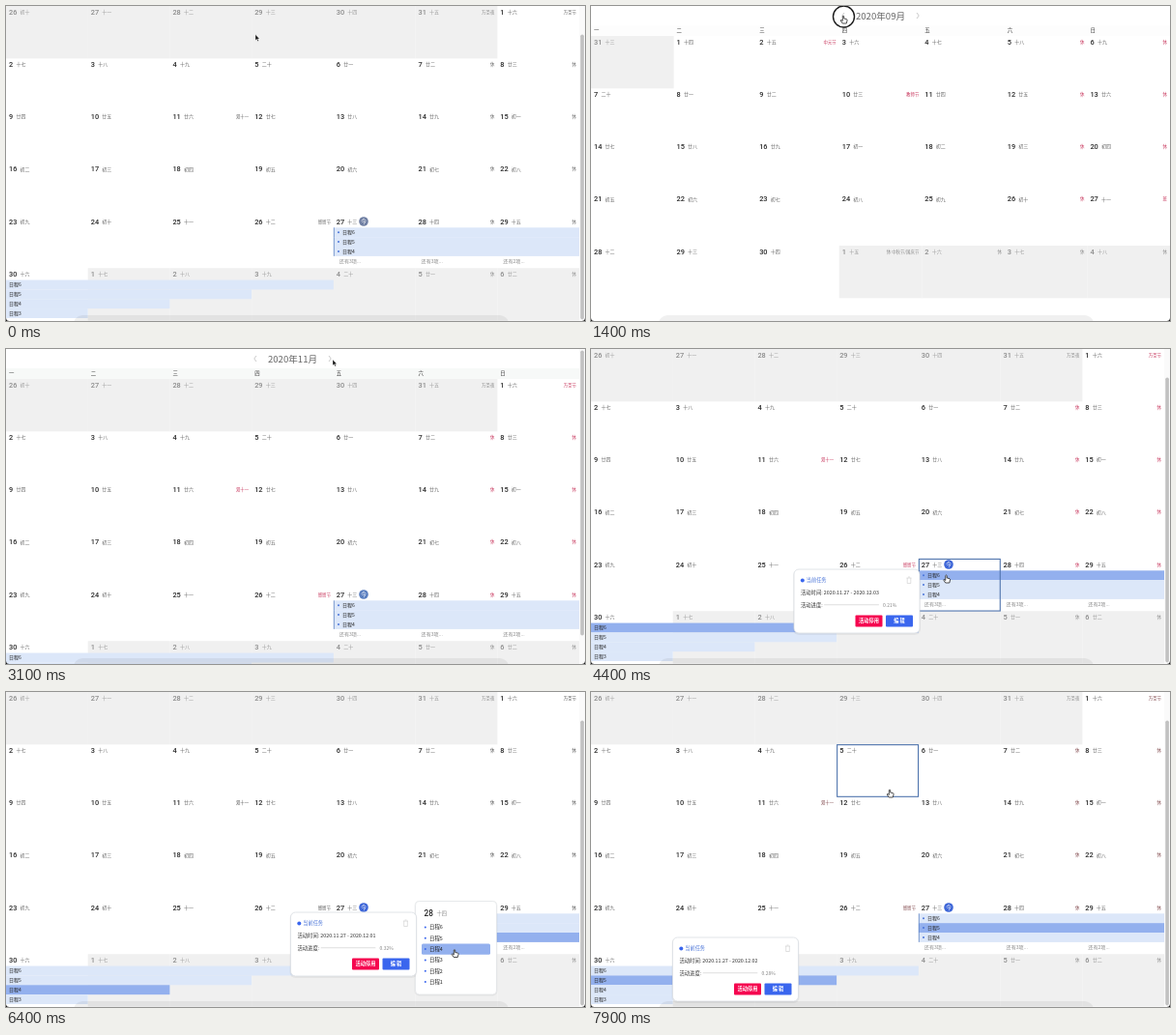
Recreate the animation shown at these times as an HTML page. Size 599x326 px, loop 8 s.

```html
<!DOCTYPE html>
<html lang="zh-CN">
<head>
<meta charset="utf-8">
<title>日历</title>
<style>
html, body { margin: 0; width: 100%; height: 100%; overflow: hidden; background: #fff; }
svg { display: block; width: 599px; height: 326px; }
text { font-family: 'Noto Sans CJK SC', 'Noto Sans CJK', 'Noto Sans', sans-serif; white-space: pre; }
.num { font-family: Roboto, Inter, sans-serif; font-weight: 500; }
.accent { fill: var(--accent); }
.today { fill: var(--today); }
</style>
</head>
<body>
<svg viewBox="0 0 599 326">
  <g id="page"><g id="months"></g><g id="live"></g></g>
  <g id="overlay"></g>
  <rect x="70" y="320" width="450" height="20" rx="9" fill="#000" opacity=".06"/>
  <path d="M0 322.500Q0 326 3.500 326H0ZM599 322.500Q599 326 595.500 326H599Z" fill="#111"/>
  <g id="pointer"></g>
</svg>
<script>
const LOOP = 8000, HEAD = 31, ROW = 54.25, DAY = 864e5;
const BAR = 9.85, LIGHT = '#dce7f9', STRONG = '#93b0ee', BLUE = '#3a66ee';
const $ = id => document.getElementById(id);

const rect = (x, y, w, h, fill, extra = '') =>
  `<rect x="${x}" y="${y}" width="${w}" height="${h}" fill="${fill}" ${extra}/>`;
const circle = (x, y, r, extra) => `<circle cx="${x}" cy="${y}" r="${r}" ${extra}/>`;
// y is the visual middle of the line
const text = (x, y, size, str, fill, extra = '') =>
  `<text x="${x}" y="${y + size * 0.37}" font-size="${size}" fill="${fill}" ${extra}>${str}</text>`;

// ---- calendar ----
const DIGITS = '一二三四五六七八九十';
const NEW_MOONS = [0, 29, 59, 88];
const FIRST_MOON = Date.UTC(2020, 7, 19);
const SPECIAL = {
  '9-2': '中元节', '9-10': '教师节', '9-27': '班', '10-1': '休 中秋节/国庆节', '10-10': '班',
  '10-25': '重阳节', '10-31': '万圣夜', '11-1': '万圣节', '11-11': '双十一', '11-26': '感恩节'
};
const MONTHS = [
  { month: 9, start: Date.UTC(2020, 7, 31), rows: 5, width: 599 },
  { month: 10, start: Date.UTC(2020, 8, 28), rows: 5, width: 599 },
  { month: 11, start: Date.UTC(2020, 9, 26), rows: 6, width: 593 }
];
const [SEP, OCT, NOV] = MONTHS;

function lunar(time) {
  const days = Math.round((time - FIRST_MOON) / DAY);
  const d = days - NEW_MOONS.filter(n => n <= days).pop();
  if (d === 19) return '二十';
  if (d === 29) return '三十';
  return '初十廿'[Math.floor(d / 10)] + DIGITS[d % 10];
}

function dayAt(m, row, col) {
  const time = m.start + (row * 7 + col) * DAY, date = new Date(time);
  return { time, month: date.getUTCMonth() + 1, day: date.getUTCDate() };
}

function note({ month, day }, col) {
  const holiday = month === 10 && day <= 8;
  return SPECIAL[`${month}-${day}`] || (col > 4 || holiday ? '休' : '');
}

function drawMonth(m) {
  const cw = m.width / 7, mid = m.width / 2;
  const chevron = (x, d) =>
    `<path d="M${x - d} 7l${d * 2.2} 3l${-d * 2.2} 3" fill="none" stroke="#bbb" stroke-width=".8"/>`;
  let out = text(mid, 10, 9.6, `2020年${String(m.month).padStart(2, '0')}月`, '#666', 'text-anchor="middle"');
  out += chevron(mid - 38.5, -1) + chevron(mid + 38.5, 1);
  out += rect(0, 20, m.width, 11, m === NOV ? '#f7f9f8' : '#fdfdfd');
  for (let col = 0; col < 7; col++) {
    out += text(col * cw + 3, 25.3, 5.4, (DIGITS.slice(0, 6) + '日')[col], '#333', 'font-weight="500"');
  }
  for (let row = 0; row < m.rows; row++) for (let col = 0; col < 7; col++) {
    const d = dayAt(m, row, col), x = col * cw, y = HEAD + row * ROW, other = d.month !== m.month;
    if (other) out += rect(x, y, cw + 0.1, ROW + 0.1, '#f0f0f0');
    out += text(x + 3, y + 5.9, 7.4, d.day, other ? '#8c8c8c' : '#2c2c2c', 'class="num"');
    out += text(x + (d.day > 9 ? 14.5 : 10.5), y + 5.9, 5, lunar(d.time), other ? '#999' : '#666');
    out += text(x + cw - 3, y + 5.9, 4.4, note(d, col), '#8c8c8c',
      `text-anchor="end" ${other ? '' : 'class="accent"'}`);
  }
  if (m === NOV) {
    const y = HEAD + 4 * ROW;
    out += circle(370, y + 6, 4.8, 'class="today"');
    out += text(370, y + 6, 5.6, '今', '#fff', 'text-anchor="middle"');
    [3, 3, 2].forEach((n, i) => {
      out += text((4 + i) * cw + 6, y + 47.3, 5.1, `还有${n}项...`, '#8a8a8a');
    });
  }
  return `<g>${out}</g>`;
}
$('months').innerHTML = MONTHS.map(drawMonth).join('');
const monthNodes = [...$('months').children];

// ---- timeline ----
const at = (list, t) => list.filter(e => e[0] <= t).pop()[1];
const ease = p => p * p * (3 - 2 * p);
const ramp = (t, a, b) => ease(Math.min(1, Math.max(0, (t - a) / (b - a))));

const SHOWN = [[0, NOV], [800, OCT], [1350, SEP], [2250, OCT], [3100, NOV]];
const ACTIVE = [[0, 0], [4300, 6], [4700, 5], [4900, 4], [7100, 5]];
const ACCENT = [[0, '#666'], [1100, '#c8385e'], [6100, '#555'], [7000, '#80484c']];
const TODAY = [[0, '#6f7fa3'], [1100, '#5a7fc0'], [3400, '#3f67d8']];
const CARD = [[0, null], [4300, [210, 228]], [5550, null], [6250, [294.5, 228]], [6750, null], [7200, [84.5, 254]]];
const CLICKS = [800, 1350, 2250, 5800];
const LIST = [5850, 6750];
const PATH = [
  [0, 258, 29.500], [200, 258, 29.500], [700, 261, 10], [1550, 261, 10], [2050, 338, 11], [3400, 338, 11],
  [4250, 367.5, 234], [4500, 367.5, 234], [4950, 366, 253], [5150, 366, 253], [5400, 397.5, 235],
  [5750, 440, 264], [5900, 440, 264], [6250, 464, 266.5], [6500, 464, 266.5],
  [7100, 45, 298], [7400, 45, 298], [7900, 309, 101], [8000, 309, 101]
];

function pointerAt(t) {
  const i = Math.max(1, PATH.findIndex(p => p[0] > t));
  const [a, ax, ay] = PATH[i - 1], [b, bx, by] = PATH[i], p = ramp(t, a, b);
  return { x: ax + (bx - ax) * p, y: ay + (by - ay) * p };
}

// ---- moving parts ----
function drawBars(active, x, y, listOpen) {
  const cw = NOV.width / 7;
  let out = '';
  const bar = (id, row, left, width, label) => {
    const top = HEAD + row * ROW + 12.3 + (6 - id) * BAR;
    const hover = !listOpen && x >= left && x < left + width && y >= top && y < top + BAR;
    out += rect(left, top, width, BAR + 0.05, id === active || hover ? STRONG : LIGHT);
    out += text(label, top + 4.9, 5, `日程${id}`, '#222');
  };
  for (let id = 6; id > 3; id--) {
    bar(id, 4, 4 * cw, 3 * cw, 348);
    const top = HEAD + 4 * ROW + 12.3 + (6 - id) * BAR;
    out += circle(344, top + 4.9, 1, 'fill="#4a74d8"') + rect(4 * cw, top, 0.8, BAR, '#6488c4');
  }
  for (let id = 6; id > 2; id--) bar(id, 5, 0, (id - 2) * cw, 3);
  return out;
}

function drawCard([x, y], id) {
  const end = { 6: '12.03', 5: '12.02', 4: '12.01' }[id];
  const rate = { 6: '0.21%', 5: '0.28%', 4: '0.32%' }[id];
  const button = (left, fill, label) => rect(left, 47.500, 28, 12, fill, 'rx="1"') +
    text(left + 14, 53.5, 5.2, label, '#fff', 'text-anchor="middle" font-weight="700"');
  return `<g transform="translate(${x} ${y})">` +
    rect(-1, 0, 132, 68, '#000', 'rx="6" opacity=".05"') +
    rect(0, 0, 130, 66, '#fff', 'rx="5" stroke="#dadde2" stroke-width=".8"') +
    circle(8.8, 11.5, 2, `fill="${BLUE}"`) + text(12.8, 11.5, 5.2, '当前任务', '#4a74d8') +
    '<path d="M116.500 9h5M117.200 9v5.500h3.600V9M118 8h2" fill="none" stroke="#ccc" stroke-width=".6"/>' +
    text(7, 24.3, 5.3, `活动时间: 2020.11.27 - 2020.${end}`, '#333') +
    text(7, 36.8, 5.3, '活动进度:', '#333') +
    rect(31, 36.3, 57, 1, '#dedede', 'rx=".5"') + text(92, 36.8, 5, rate, '#888') +
    button(63.5, '#f5064f', '活动停用') + button(95, BLUE, '编 辑') + '</g>';
}

function drawList(px, py) {
  let out = rect(422.500, 216, 86, 98.500, '#000', 'rx="5" opacity=".05"') +
    rect(423.5, 216.5, 84, 96.5, '#fff', 'rx="4" stroke="#e0e2e6" stroke-width=".7"') +
    text(432.5, 229, 8.2, '28', '#222', 'class="num"') + text(445.5, 229, 5.3, '十四', '#888');
  for (let i = 0; i < 6; i++) {
    const y = 243.5 + i * 11.3;
    if (px > 430 && px < 501 && Math.abs(py - y) < 5.65) out += rect(430, y - 5.6, 71, 11.2, STRONG, 'rx="1.5"');
    out += circle(433.8, y, 1, `fill="${BLUE}"`) + text(438, y, 5.4, `日程${6 - i}`, '#222');
  }
  return out;
}

function drawPointer(x, y, hand) {
  const shape = hand
    ? 'M-.7 .5Q0-.5 .7 .5V3L3.500 3.600Q4.200 4 4 5L3.300 8H-.8L-2.800 5Q-2.600 4-1.600 4.700L-.7 5.500Z'
    : 'M0 0V6L1.400 4.800L2.400 7L3.400 6.500L2.400 4.500H4.200Z';
  return `<path transform="translate(${x} ${y})" d="${shape}" fill="${hand ? '#fff' : '#111'}"
    stroke="${hand ? '#222' : '#fff'}" stroke-width="${hand ? 0.8 : 0.35}"/>`;
}

function render(t) {
  const m = at(SHOWN, t), active = at(ACTIVE, t), card = at(CARD, t);
  const listOpen = t >= LIST[0] && t < LIST[1];
  const scroll = m === NOV ? 31 * (1 - ramp(t, 200, 500) + ramp(t, 3400, 3750)) : 0;
  const { x, y } = pointerAt(t), pageY = y + scroll, cw = m.width / 7;
  const col = Math.floor(x / cw), row = Math.floor((pageY - HEAD) / ROW);
  const onDay = row >= 0 && row < m.rows && dayAt(m, row, col).month === m.month;

  document.documentElement.style.setProperty('--accent', at(ACCENT, t));
  document.documentElement.style.setProperty('--today', at(TODAY, t));
  monthNodes.forEach((node, i) => { node.style.display = MONTHS[i] === m ? '' : 'none'; });
  $('page').setAttribute('transform', `translate(0 ${-scroll})`);

  let live = m === NOV ? drawBars(active, x, pageY, listOpen) : '';
  if (onDay && !listOpen) {
    live += rect(col * cw + 0.5, HEAD + row * ROW + 0.4, cw - 0.8, ROW - 0.6, 'none',
      'stroke="#4f74ad" stroke-width="1.1"');
  }
  $('live').innerHTML = live;

  let over = '';
  if (m === NOV) over += rect(593, 0, 6, 326, '#fafafa') + rect(594.3, 1.5 + scroll * 0.9, 3.6, 295, '#c1c1c1', 'rx="1.800"');
  if (listOpen) over += drawList(x, y);
  if (card) over += drawCard(card, active);
  $('overlay').innerHTML = over;

  const clicking = CLICKS.some(c => t >= c && t < c + 200);
  const hand = onDay || listOpen || (y < 20 && t < 3100);
  $('pointer').innerHTML =
    (clicking ? circle(x + 0.5, y + 1, 11, 'fill="none" stroke="#1c1c1c" stroke-width="1.4"') : '') +
    drawPointer(x, y, hand);
}

const begin = performance.now();
function tick() {
  render((performance.now() - begin) % LOOP);
  requestAnimationFrame(tick);
}
tick();
</script>
</body>
</html>
```
